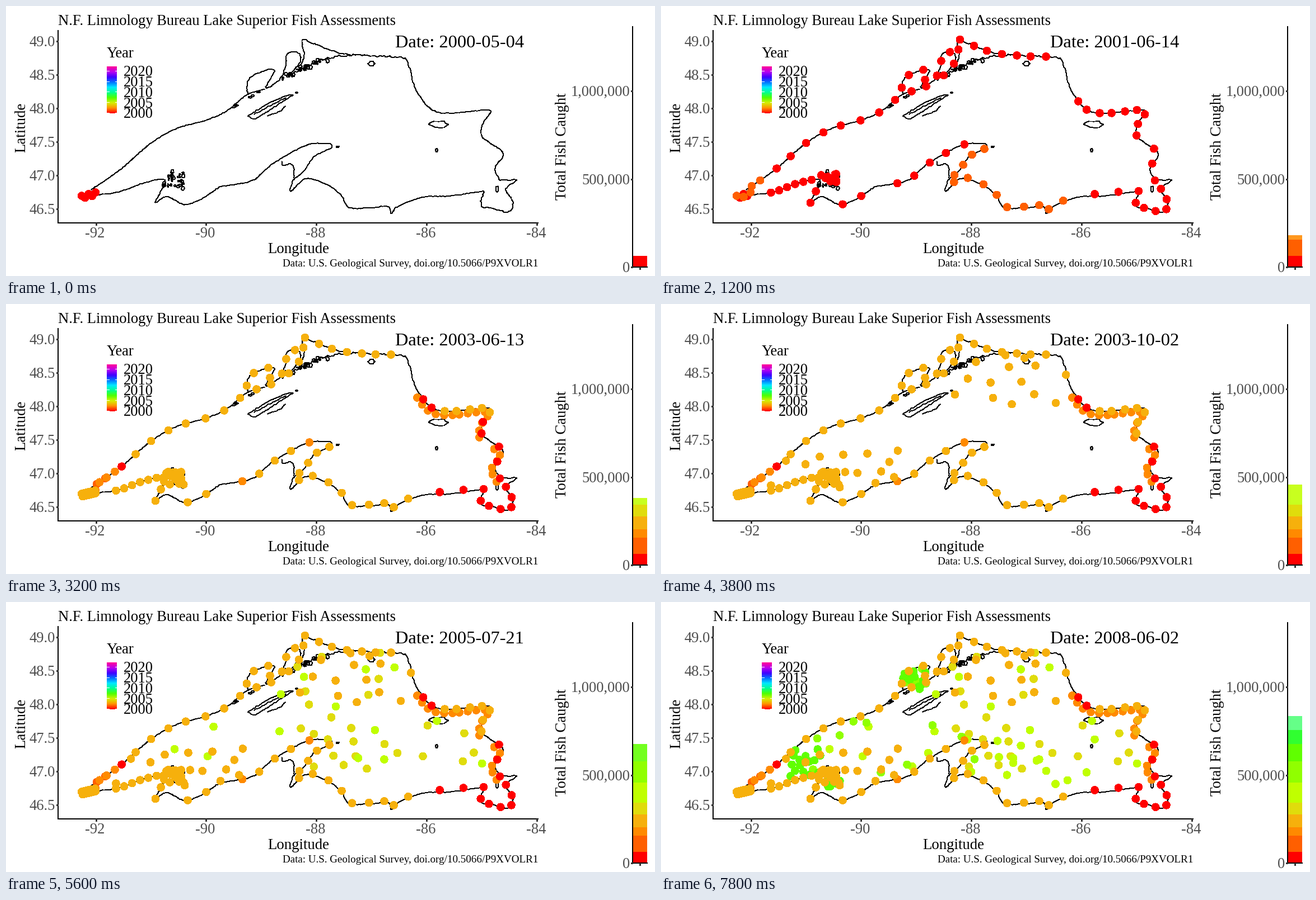
A matplotlib script for the animation above (8000 ms loop, 1159 by 483 pixels).

```python
import numpy as np
import matplotlib.pyplot as plt
from matplotlib.animation import FuncAnimation
from matplotlib.colors import LinearSegmentedColormap, to_rgb
from matplotlib.patches import Rectangle
from matplotlib.path import Path

W, H, DPI = 1159, 483, 100
FRAMES, STEP = 40, 200
PX = 72 / DPI
rng = np.random.default_rng(11)

plt.rcParams["font.family"] = "Liberation Serif"
fig = plt.figure(figsize=(W / DPI, H / DPI), dpi=DPI, facecolor="white")
ax = fig.add_axes([0, 0, 1, 1])


def label(x, y, s, size=26.5, ha="left", color="black", rotation=0):
    return ax.text(x, y, s, fontsize=size * PX, ha=ha, va="baseline",
                   color=color, rotation=rotation, rotation_mode="anchor")


def line(xs, ys, width=1.9, color="black", z=5):
    ax.plot(xs, ys, color=color, lw=width * PX, antialiased=False,
            solid_capstyle="butt", zorder=z)


# ---- shoreline ----
def curve(keys, spacing=3):
    """Catmull-Rom curve through the key points, evenly resampled."""
    k = np.array(keys, float)
    k = np.vstack([2 * k[0] - k[1], k, 2 * k[-1] - k[-2]])
    t = np.linspace(0, 1, 24, endpoint=False)[:, None]
    parts = []
    for a, b, c, d in zip(k, k[1:], k[2:], k[3:]):
        # short neighbours get short tangents, so corners do not overshoot
        size = np.hypot(*(c - b))
        m0 = (c - a) * size / (size + np.hypot(*(b - a)))
        m1 = (d - b) * size / (size + np.hypot(*(d - c)))
        parts.append((2 * t**3 - 3 * t**2 + 1) * b + (t**3 - 2 * t**2 + t) * m0
                     + (3 * t**2 - 2 * t**3) * c + (t**3 - t**2) * m1)
    p = np.vstack(parts + [k[-2:-1]])
    length = np.r_[0, np.cumsum(np.hypot(*np.diff(p, axis=0).T))]
    s = np.linspace(0, length[-1], max(2, int(length[-1] / spacing)))
    return np.column_stack([np.interp(s, length, p[:, i]) for i in (0, 1)])


def shore(keys, amp):
    """Draw a ragged coast and return its smooth course."""
    p = curve(keys)
    q = p + rng.uniform(-amp, amp, p.shape)
    q[[0, -1]] = p[[0, -1]]
    line(q[:, 0], q[:, 1], 0.9, z=1)
    return p


def islet(x, y, rx, ry):
    a = np.linspace(0, 2 * np.pi, 13)
    r = rng.uniform(0.75, 1.15, 13)
    r[-1] = r[0]
    line(x + rx * r * np.cos(a), y + ry * r * np.sin(a), 0.9, z=1)


minnesota = shore([(152, 329), (205, 292), (262, 243), (308, 218), (355, 205),
                   (392, 189), (432, 158), (462, 149)], 0.6)
thunder = shore([(432, 158), (430, 143), (438, 126), (479, 114), (464, 147),
                 (487, 133), (499, 109), (503, 85), (522, 84), (526, 98),
                 (505, 124)], 0.9)
nipigon = shore([(527, 104), (533, 88), (528, 60), (553, 69), (588, 82),
                 (615, 87)], 1.3)
ontario = shore([(505, 124), (536, 108), (575, 93), (620, 88), (655, 90),
                 (712, 94), (722, 112)], 1.7)
east = shore([(722, 112), (730, 145), (758, 184), (790, 192), (866, 187),
              (852, 210), (850, 233), (888, 264), (873, 290), (882, 312)], 0.8)
whitefish = shore([(882, 312), (912, 312), (893, 326), (900, 340), (905, 352),
                   (898, 368), (862, 361), (848, 358), (853, 331)], 1.4)
michigan = shore([(853, 331), (790, 340), (745, 342), (697, 360), (688, 372),
                  (683, 359), (650, 361), (612, 360), (598, 338), (570, 318),
                  (535, 309), (508, 332), (512, 312)], 0.6)
keweenaw = shore([(512, 312), (532, 295), (551, 269), (583, 252), (578, 246),
                  (540, 248), (505, 265), (470, 287), (440, 312), (383, 323)], 0.6)
wisconsin = shore([(383, 323), (345, 347), (318, 355), (287, 341), (266, 352),
                   (275, 335), (283, 311), (245, 317), (200, 333), (154, 339)], 0.7)
shore([(493, 278), (496, 286), (508, 281), (514, 292), (514, 308)], 1)
shore([(432, 197), (475, 171), (513, 158), (480, 180), (443, 202), (432, 197)], 0.8)
shore([(443, 194), (467, 181), (500, 164)], 1)
shore([(467, 197), (489, 188), (499, 179)], 0.8)
lake = Path(np.vstack([minnesota, ontario, east, whitefish, michigan, keweenaw,
                       wisconsin]))

for spot in [(773, 212, 18, 6), (769, 258, 2, 3), (592, 252, 3, 1.5),
             (653, 103, 6, 4), (519, 155, 2, 1), (877, 327, 3, 5)]:
    islet(*spot)
for _ in range(24):
    islet(rng.uniform(277, 318), rng.uniform(294, 330), *rng.uniform(1, 4, 2))
for t in rng.uniform(0, 1, 24):
    islet(490 + 85 * t, 130 - 36 * t + rng.uniform(-7, 4), *rng.uniform(1, 4, 2))
for t in rng.uniform(0, 1, 6):
    islet(393 + 60 * t, 189 - 36 * t, 3, 1.5)

# ---- fixed text and axes ----
GREY, TICK = "#4d4d4d", "#333333"
line([93, 93], [43, 389])
line([92, 951], [388, 388])
for i in range(6):
    y = 62.5 + 60 * i
    line([90, 93], [y, y], 1.2, TICK)
    label(87.5, y + 9, f"{49 - i / 2:.1f}", ha="right", color=GREY)
for i in range(5):
    x = 160.5 + 196.9 * i
    line([x, x], [388, 391.5], 1.2, TICK)
    label(x - 1.5, 414, str(-92 + 2 * i), ha="center", color=GREY)

label(93, 34, "N.F. Limnology Bureau Lake Superior Fish Assessments")
label(522, 441.5, "Longitude", 26.7, "center")
label(34, 217, "Latitude", 26.7, "center", rotation=90)
label(951, 466, "Data: U.S. Geological Survey, doi.org/10.5066/P9XVOLR1", 19, "right")
label(1000, 251, "Total Fish Caught", 26.7, "center", rotation=90)
date_text = label(695, 74.5, "", 32.5)

line([1119, 1119], [36, 468])
line([1118, 1146], [467, 467])
line([1132, 1132], [467, 470.5], 1.2, TICK)
for i, s in enumerate(["0", "500,000", "1,000,000"]):
    y = 467 - 157.3 * i
    line([1116, 1119], [y, y], 1.2, TICK)
    label(1114, y + 9, s, ha="right", color=GREY)

# ---- year legend ----
label(180, 91.5, "Year")
cmap = LinearSegmentedColormap.from_list("years", [
    "#ff0000", "#ff9500", "#d4f000", "#50ff00", "#00ff90",
    "#00e8ff", "#0070ff", "#4000ff", "#b800f0", "#ff0099"])
ax.imshow(np.linspace(1, 0, 84)[:, None], cmap=cmap, extent=(180, 198, 192, 108),
          aspect="auto", interpolation="nearest", zorder=2)
for i in range(5):
    y = 191 - 18.8 * i
    for x in (180, 194.5):
        line([x, x + 3.5], [y, y], 1, "white")
    label(210, y + 9.5, str(2000 + 5 * i))
ax.set_xlim(0, W)
ax.set_ylim(H, 0)
ax.axis("off")


# ---- survey sites ----
def along(course, n, lo, hi, shift=(0, 0)):
    """n sites evenly spaced between two shares of a coast."""
    i = np.linspace(lo, hi, n) * (len(course) - 1)
    return course[np.round(i).astype(int)] + shift


def open_water(n, x0, x1, y0, y1, gap=13):
    """Up to n random sites in a box of the lake, kept apart."""
    found = []
    for p in rng.uniform((x0, y0), (x1, y1), (3000, 2)):
        if len(found) < n and lake.contains_point(p) and all(
                np.hypot(*(p - q)) > gap for q in found):
            found.append(p)
    return np.array(found)


def cloud(n, x, y, sx, sy):
    return np.array([x, y]) + rng.uniform(-1, 1, (n, 2)) * (sx, sy)


def duluth(n):
    t = np.linspace(0, 1, n)
    return np.column_stack([135 + 25 * t, 342 - 6 * t - 2.5 * (-1) ** np.arange(n)])


north_west = along(minnesota, 9, .18, .96)
north = np.vstack([along(thunder, 10, .05, 1), along(nipigon, 5, .2, .95),
                   along(ontario, 3, .58, .8)])
north_east = along(east, 9, .18, .7)
south_west = np.vstack([along(wisconsin, 6, .62, .86), along(wisconsin, 2, .42, .5),
                        along(wisconsin, 2, .1, .22)])
apostles = cloud(10, 297, 308, 17, 10)
peninsula = along(keweenaw, 5, .44, .88)
south = np.vstack([along(keweenaw, 4, .05, .28), along(michigan, 9, .33, .9, (0, -2))])
lasting = np.vstack([north_west[:1], along(east, 3, .81, 1),
                     along(whitefish, 7, .3, 1), along(michigan, 2, .09, .19, (0, -4))])

# year, first and last step, layer, sites
GROUPS = [
    (2000, 0, 0, 3, duluth(5)),
    (2000, 1, 2, 3, [*south_west, *apostles, *peninsula]),
    (2000, 1, 5, 4, lasting),
    (2000, 2, 5, 3, [*north_west[1:], *north, *north_east]),
    (2001, 4, 6, 5, [*duluth(3), *along(minnesota, 2, .03, .08), *south]),
    (2002, 7, 11, 6, [*duluth(9), *along(minnesota, 3, .05, .14), *north_west[1:4],
                      *south_west[6:], *apostles, *peninsula, *south]),
    (2002, 9, 12, 2, [*along(east, 14, .15, .7, (-4, 7)),
                      *along(east, 6, .8, 1, (-6, 6))]),
    (2003, 13, 16, 7, [*duluth(14), *south_west, *apostles, *cloud(14, 297, 311, 22, 12),
                       *peninsula[1:4], *south]),
    (2003, 14, 19, 7, [*north_west[1:], *north, *north_east[2:],
                       *open_water(15, 160, 440, 260, 340, 20),
                       *open_water(14, 500, 740, 90, 180, 22)]),
    (2004, 20, 25, 1, open_water(25, 520, 860, 90, 300, 24)),
    (2005, 25, 28, 1.2, open_water(14, 230, 860, 110, 290, 40)),
    (2005, 29, 31, 1.2, open_water(15, 420, 800, 245, 330, 22)),
    (2006, 31, 34, 1.4, [*open_water(11, 220, 560, 210, 310, 22),
                         *cloud(9, 455, 134, 20, 15)]),
    (2007, 35, 39, 1.6, [*open_water(15, 230, 290, 260, 312, 9),
                         *cloud(12, 452, 140, 20, 18), *cloud(5, 310, 322, 12, 10)]),
]
YEARS = ["#ff0000", "#ff5f00", "#ff8a00", "#f6b00c", "#e0dc0c",
         "#c0ff00", "#90ff00", "#60ff00", "#30ff30", "#50ff78"]
RGB = np.array([to_rgb(c) for c in YEARS])

GROUPS.sort(key=lambda g: g[3])
spots = np.vstack([g[4] for g in GROUPS])
born = np.concatenate([np.round(np.linspace(g[1], g[2], len(g[4]))) for g in GROUPS])
tint = RGB[np.repeat([g[0] - 2000 for g in GROUPS], [len(g[4]) for g in GROUPS])]
dots = ax.scatter([], [], s=(13.6 * PX) ** 2, linewidths=0, antialiased=False, zorder=3)

# ---- stacked total and date ----
ENDS = [447, 418, 403, 380, 359, 323, 285, 254, 229, 204]
bars = [ax.add_patch(Rectangle((1120, 466), 25, 0, lw=0, antialiased=False, zorder=4))
        for _ in ENDS]

KNOTS = [0, 6, 12, 19, 28, 34, 39]
TOPS = [447, 410, 380, 323, 254, 224, 204]
DATES = ["2000-05-04", "2001-06-14", "2002-08-14", "2003-10-02",
         "2005-07-21", "2006-10-15", "2008-06-02"]


def to_season(text):
    """Year plus the elapsed share of the sampling season."""
    day = (np.datetime64(text) - np.datetime64(text[:4] + "-01-01")).astype(int)
    return int(text[:4]) + (day - 100) / 210


def from_season(s):
    year = int(s)
    return str(np.datetime64(f"{year}-01-01") + int(round(100 + 210 * (s - year))))


SEASONS = [to_season(d) for d in DATES]


def update(k):
    date_text.set_text("Date: " + from_season(np.interp(k, KNOTS, SEASONS)))

    live = born <= k
    dots.set_offsets(spots[live])
    dots.set_facecolors(tint[live])

    top = np.interp(k, KNOTS, TOPS)
    base = 466.5
    for bar, end, rgb in zip(bars, ENDS, RGB):
        edge = min(base, max(end, top))
        newest = k > 0 and end <= top < base
        bar.set_y(edge)
        bar.set_height(base - edge)
        bar.set_facecolor(0.88 * rgb + 0.12 if newest else rgb)
        base = edge
    return [date_text, dots, *bars]


anim = FuncAnimation(fig, update, frames=FRAMES, interval=STEP, repeat=True,
                     repeat_delay=0, init_func=lambda: update(0))
plt.show()
```
